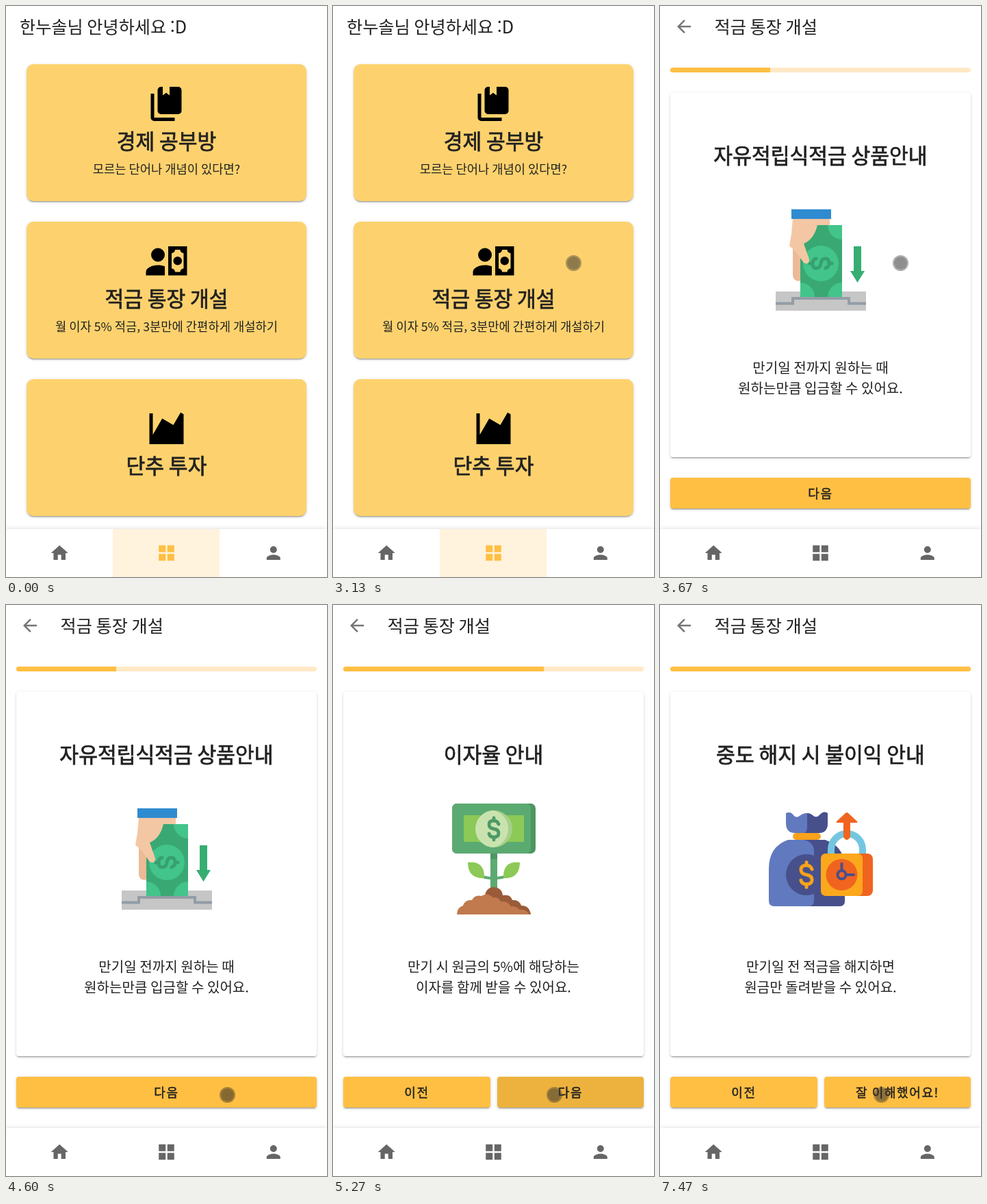
These frames come from a looping animation (469 by 834 pixels, 8000 ms). An HTML page:

```html
<!DOCTYPE html>
<html lang="ko">
<head>
<meta charset="utf-8">
<title>적금 통장 개설</title>
<style>
html, body { margin: 0; width: 100%; height: 100%; overflow: hidden; background: #fff; }
#stage { position: relative; width: 469px; height: 834px; overflow: hidden; color: #212121;
  font-family: 'Noto Sans CJK KR', 'Noto Sans KR', 'Noto Sans CJK JP', 'Noto Sans CJK SC', 'Noto Sans CJK', sans-serif; }
#stage div, svg { position: absolute; box-sizing: border-box; }
svg { left: 0; top: 0; }
.scene { inset: 0; }
.tile { left: 30px; width: 409px; height: 200px; border-radius: 10px; background: #fdd26e; }
.raised { box-shadow: 0 3px 1px -2px #0003, 0 2px 2px #00000024, 0 1px 5px #0000001f; }
.paper { left: 15px; top: 127px; width: 439px; height: 532px; border-radius: 4px; background: #fff; }
.track { left: 15px; top: 90px; width: 439px; height: 7px; border-radius: 4px; background: #ffe9c6; overflow: hidden; }
#bar { left: 0; top: 0; height: 7px; background: #ffbf43; }
.button { left: 15px; top: 689px; width: 215px; height: 45px; border-radius: 4px; background: #ffbf43;
  font-size: 18px; letter-spacing: .0893em; line-height: 45px; text-align: center; -webkit-text-stroke: .45px; }
#shade { inset: 0; border-radius: 4px; overflow: hidden; }
#ripple { left: -1.5px; top: -283px; width: 618px; height: 618px; border-radius: 50%; background: #000; }
#lift { inset: 0; border-radius: 4px; box-shadow: 0 5px 5px -3px #0003, 0 8px 10px 1px #00000024; }
.nav { left: 0; top: 764px; width: 469px; height: 70px; background: #fff; box-shadow: 0 0 7px #00000026; }
#tint { left: 156px; top: 0; width: 156px; height: 70px; }
#cursor { width: 23px; height: 23px; border-radius: 50%; border: 2px solid #32323266;
  background: #3232328c padding-box; }
text { fill: #212121; text-anchor: middle; font-size: 20.1px; }
.head { font-size: 25.2px; text-anchor: start; }
.title { font-size: 30.2px; stroke: #212121; stroke-width: .75px; }
.note { font-size: 17.7px; }
.dollar { fill: none; stroke-linecap: round; stroke-linejoin: round; }
#blank { position: absolute; visibility: hidden; white-space: pre; font-size: 100px; }
</style>
</head>
<body>
<div id="stage">
  <span id="blank"> </span>
  <div class="scene" id="menu">
    <div class="tile raised" style="top:85px"></div>
    <div class="tile raised" style="top:315px"></div>
    <div class="tile raised" style="top:545px"></div>
    <svg width="469" height="834">
      <text class="head" x="20" y="39.6">한누솔님 안녕하세요 :D</text>
      <path transform="translate(204 113) scale(2.5)" d="M19 18H9a2 2 0 0 1-2-2V4a2 2 0 0 1 2-2h1v5l2-1.5L14 7V2h5a2 2 0 0 1 2 2v12a2 2 0 0 1-2 2m-2 2v2H5a2 2 0 0 1-2-2V6h2v14z"/>
      <text class="title" x="234.5" y="208.6">경제 공부방</text>
      <text class="note" x="234.5" y="245">모르는 단어나 개념이 있다면?</text>
      <path transform="translate(204.5 343.5) scale(2.5)" fill-rule="evenodd" d="M11 8a4 4 0 1 1-8 0 4 4 0 0 1 8 0m0 6.72V20H0v-2c0-2.21 3.13-4 7-4 1.5 0 2.87.27 4 .72M24 20H13V3h11zm-8-8.5a2.5 2.5 0 0 1 5 0 2.5 2.5 0 0 1-5 0M22 7a2 2 0 0 1-2-2h-3a2 2 0 0 1-2 2v9a2 2 0 0 1 2 2h3a2 2 0 0 1 2-2z"/>
      <text class="title" x="234.5" y="438.6">적금 통장 개설</text>
      <text class="note" x="234.5" y="475">월 이자 5% 적금, 3분만에 간편하게 개설하기</text>
      <path transform="translate(204.5 587.5) scale(2.5)" d="M2 3h2v12.54L9.5 6 16 9.78l4.24-7.33L22 3.45V21H2z"/>
      <text class="title" x="234.5" y="682.6">단추 투자</text>
    </svg>
  </div>

  <div class="scene" id="guide">
    <div class="track"><div id="bar"></div></div>
    <div class="paper raised"></div>
    <svg width="469" height="834">
      <defs>
        <path id="dollar" class="dollar" d="M7-7Q5-12 0-12-7-12-7-6.5-7-1 0 0 7 1 7 6.5 7 12 0 12-6 12-7 7M0-12v-4M0 12v4"/>
      </defs>
      <path transform="translate(20 15) scale(1.25)" fill="#757575" d="M20 11H7.83l5.59-5.59L12 4l-8 8 8 8 1.41-1.41L7.83 13H20z"/>
      <text class="head" x="79.5" y="39.6">적금 통장 개설</text>

      <g class="slide">
        <text class="title upper" x="234.5" y="229.6">자유적립식적금 상품안내</text>
        <g class="picture">
          <path fill="#c6c6c6" d="M169 417h132v28H169z"/>
          <path fill="none" stroke="#939da6" stroke-width="4" d="M169 434.5h25v-7.5h82v7.5h25"/>
          <path fill="#edba96" d="M194 345h12v56q-11 3-12-8z"/>
          <path fill="#3aa873" d="M205 320h61v105h-61z"/>
          <g fill="#42c48a">
            <circle cx="235" cy="376" r="26"/>
            <path d="M266 320v21a21 21 0 0 1-21-21zM266 425h-21a21 21 0 0 1 21-21zM205 425v-21a21 21 0 0 1 21 21z"/>
          </g>
          <use href="#dollar" transform="translate(235 376) rotate(90)" stroke="#37a070" stroke-width="5"/>
          <path fill="#f4c7a4" d="M194 310h54v10h-18c-3 13-10 23-20 27l8 23q0 9-8 5l-11-15q-8-8-10-10l3-17z"/>
          <path fill="#2f8bd0" d="M192 297h58v14h-58z"/>
          <path fill="#36ae72" d="M283 351h11v36h5l-10.5 17-10.5-17h5z"/>
        </g>
        <g class="lower">
          <text x="234.5" y="536">만기일 전까지 원하는 때</text>
          <text x="234.5" y="566">원하는만큼 입금할 수 있어요.</text>
        </g>
      </g>

      <g class="slide">
        <text class="title" x="234.5" y="229.6">이자율 안내</text>
        <path fill="#5baa71" d="M230 360h10v60h-10z"/>
        <path fill="#4d9562" d="M230 360h10v11h-10z"/>
        <rect x="174" y="290" width="122" height="73" rx="7" fill="#4d9562"/>
        <rect x="174" y="290" width="115" height="73" rx="7" fill="#5baa71"/>
        <path fill="#8cc957" d="M191 307h88v39h-88z"/>
        <circle cx="235" cy="327" r="27" fill="#a7d08a"/>
        <path fill="#c9e3ae" d="M235 300a27 27 0 1 0 0 54c28-8 28-46 0-54"/>
        <use href="#dollar" transform="translate(235 327)" stroke="#4d9a66" stroke-width="4.8"/>
        <path fill="none" stroke="#5baa71" stroke-width="4" d="M212 394q8 5 23 5 15 0 23-5"/>
        <path fill="#8cc957" d="M197 376q25-3 24 23-24 1-24-23M273 376q-25-3-24 23 24 1 24-23"/>
        <path fill="#9a5b38" d="M222 426a13 13 0 0 1 26-2q11-2 14 7 10-1 13 8 12 0 14 13h-60z"/>
        <path fill="#c07a4e" d="M181 452q0-10 9-13 3-9 13-8 4-8 14-6 9-6 16 2 9-1 12 6 11-1 14 7 10 0 13 5 9-2 15 7z"/>
        <text x="234.5" y="536">만기 시 원금의 5%에 해당하는</text>
        <text x="234.5" y="566">이자를 함께 받을 수 있어요.</text>
      </g>

      <g class="slide">
        <text class="title" x="234.5" y="229.6">중도 해지 시 불이익 안내</text>
        <path fill="#6179be" d="M184 304q7-3 11 3 4 5 9 1 10-8 20 0 5 4 10-2 5-6 11-2v14q0 15-13 15h-35q-13 0-13-15zM187 343h54q29 10 29 42v47q0 8-8 8h-95q-8 0-8-8v-47q0-32 28-42"/>
        <path fill="#47508b" d="M215 304q5 0 9 4 5 4 10-2 5-6 11-2v14q0 15-13 15h-21q4-2 4-9zM211 343h30q29 10 29 42v47q0 8-8 8h-45q8 0 8-8v-73q0-12-14-16"/>
        <rect x="194" y="333" width="41" height="10" rx="5" fill="#f9a21b"/>
        <circle cx="214" cy="394" r="30" fill="#47508b"/>
        <use href="#dollar" transform="translate(214 394) scale(1.15)" stroke="#f9a21b" stroke-width="4.3"/>
        <path fill="none" stroke="#74c6e0" stroke-width="10" d="M250 366v-9a23 23 0 0 1 46 0v9"/>
        <rect x="235" y="363" width="76" height="62" rx="8" fill="#f0641f"/>
        <path fill="#fba81c" d="M243 363h45q8 0 8 8v46q0 8-8 8h-45q-8 0-8-8v-46q0-8 8-8"/>
        <circle cx="265.5" cy="394" r="23" fill="#f0641f"/>
        <path fill="none" stroke="#47508b" stroke-width="4" stroke-linecap="round" d="M265.5 378v10M272 394h11"/>
        <circle cx="265.5" cy="394" r="6" fill="#f0641f" stroke="#47508b" stroke-width="4"/>
        <path fill="#f0641f" d="M271 304q2-2 4 0l13 12q1 2-1 2h-9v21q-5 8-10 0v-21h-9q-2 0-1-2z"/>
        <text x="234.5" y="536">만기일 전 적금을 해지하면</text>
        <text x="234.5" y="566">원금만 돌려받을 수 있어요.</text>
      </g>
    </svg>
    <div class="button raised" id="prev">이전</div>
    <div class="button raised" id="next"><div id="lift"></div><div id="shade"><div id="ripple"></div></div><span id="label"></span></div>
  </div>

  <div class="nav">
    <div id="tint"></div>
    <svg width="469" height="70" fill="#666">
      <path transform="translate(63.2 20) scale(1.25)" d="M10 20v-6h4v6h5v-8h3L12 3 2 12h3v8z"/>
      <path id="grid" transform="translate(219.5 20) scale(1.25)" d="M3 3h8v8H3zM13 3h8v8h-8zM3 13h8v8H3zM13 13h8v8h-8z"/>
      <path transform="translate(375.8 20) scale(1.25)" d="M12 12a4 4 0 1 0 0-8 4 4 0 0 0 0 8m0 2c-2.67 0-8 1.34-8 4v2h16v-2c0-2.66-5.33-4-8-4"/>
    </svg>
  </div>
  <div id="cursor"></div>
</div>

<script>
const LOOP = 8000, OPEN = 3270, LOADED = 3330, PRESS = 4574, SECOND = 4765, THIRD = 7000;
const el = id => document.getElementById(id);
const slides = document.querySelectorAll('.slide');
const [picture, upper, lower] = ['.picture', '.upper', '.lower'].map(s => document.querySelector(s));
const clamp = x => Math.min(1, Math.max(0, x));
const ramp = (t, start, length) => clamp((t - start) / length);
const show = (node, on) => { node.style.visibility = on ? 'inherit' : 'hidden'; };

// cubic-bezier(.4, 0, .2, 1)
function ease(x) {
  let lo = 0, hi = 1, s = 0;
  for (let i = 0; i < 20; i++) {
    s = (lo + hi) / 2;
    const bx = 1.2 * s * (1 - s) ** 2 + 0.6 * s * s * (1 - s) + s ** 3;
    if (bx < x) lo = s; else hi = s;
  }
  return s * s * (3 - 2 * s);
}

// Korean word gap of .224em, whichever face supplies the blank
function setWordGap() {
  const gap = 0.224 - el('blank').getBoundingClientRect().width / 100;
  document.querySelectorAll('text, .button').forEach(n => { n.style.wordSpacing = gap + 'em'; });
}

// time, then the centre of the pointer; no centre means hidden
const pointer = [
  [0], [1400, 318.5, 441.5], [1670, 318.5, 434], [1730, 322, 408], [1870],
  [2000, 328.5, 375.5], [2070], [2270, 351.5, 375.5], [OPEN],
  [LOADED, 351.5, 375.5], [4000], [4470, 323.5, 715.5]
];

function drawPointer(t) {
  const [, x, y] = pointer.filter(p => p[0] <= t).pop();
  const c = el('cursor');
  show(c, x !== undefined);
  c.style.left = x - 11.5 + 'px';
  c.style.top = y - 11.5 + 'px';
  const pressed = (t >= 3070 && t < 3130) || (t >= PRESS && t < SECOND);
  c.style.filter = pressed ? 'brightness(.7)' : 'none';
}

function drawNav(t) {
  const left = 1 - ramp(t, OPEN, 350);
  el('tint').style.background = t < OPEN ? '#fff3dd' : `rgba(0,0,0,${0.12 * left})`;
  const mix = (a, b) => b + (a - b) * left;
  el('grid').style.fill = `rgb(${mix(255, 102)},${mix(191, 102)},${mix(67, 102)})`;
}

function drawButton(t, index) {
  const next = el('next').style, ripple = el('ripple').style;
  next.left = (index ? 240 : 15) + 'px';
  next.width = (index ? 214 : 439) + 'px';
  el('label').textContent = index === 2 ? '잘 이해했어요!' : '다음';
  show(el('prev'), index > 0);

  const hover = index === 1 ? 0.07 * ease(ramp(t, SECOND, 250)) : 0;
  el('shade').style.background = `rgba(0,0,0,${hover})`;
  el('lift').style.opacity = index ? 0 : ease(ramp(t, PRESS, 250));

  // the ripple keeps its offset inside the button when the button narrows
  const grow = ease(ramp(t, PRESS, 550));
  ripple.transform = `scale(${grow})`;
  ripple.opacity = t < PRESS ? 0 : (0.1 + 0.2 * grow) * (1 - ease(ramp(t, SECOND, 500)));
}

function draw(t) {
  const index = t < SECOND ? 0 : t < THIRD ? 1 : 2;
  show(el('menu'), t < OPEN);
  show(el('guide'), t >= OPEN);
  slides.forEach((s, i) => show(s, i === index));

  // without the picture the text closes up around the middle
  const gap = t < LOADED ? 81 : 0;
  show(picture, !gap);
  upper.setAttribute('transform', `translate(0 ${gap})`);
  lower.setAttribute('transform', `translate(0 ${-gap})`);

  const steps = 1 + ramp(t, 4772, 400) + ramp(t, 7030, 400);
  el('bar').style.width = steps * 100 / 3 + '%';
  drawButton(t, index);
  drawNav(t);
  drawPointer(t);
}

function tick() {
  draw(performance.now() % LOOP);
  requestAnimationFrame(tick);
}
setWordGap();
tick();
</script>
</body>
</html>
```
